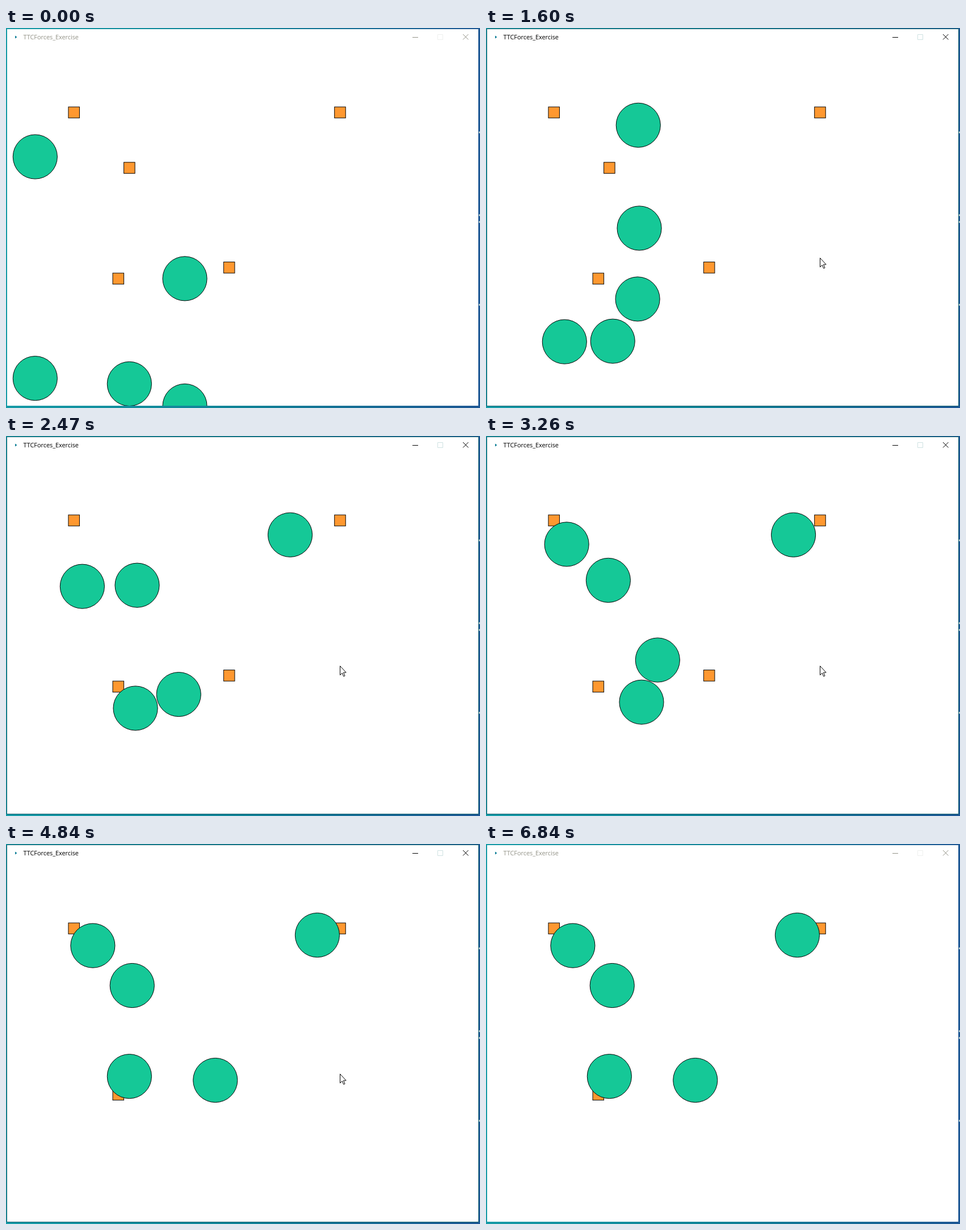
Write an HTML page that moves like this. It is 835 px wide and 670 px high and loops after 6900 ms.

```html
<!DOCTYPE html>
<html lang="en">
<head>
<meta charset="utf-8">
<title>TTCForces_Exercise</title>
<style>
  html, body { margin: 0; height: 100%; overflow: hidden; }
  svg { display: block; width: 835px; height: 670px; }
  .ball { fill: #15c897; stroke: #000; }
  .box { fill: #ff9830; stroke: #000; }
  .title { font: 11px "Open Sans", "Noto Sans", sans-serif; letter-spacing: -.08px; fill: var(--ink); }
  .icons { fill: none; stroke: var(--ink); }
  svg { --ink: #949489; --max: #eef0ee; --line: none; }
  svg.active { --ink: #000; --max: #cfe2e2; --line: #12606f; }
</style>
</head>
<body>
<svg id="stage" viewBox="0 0 835 670">
  <defs>
    <linearGradient id="desk">
      <stop offset="0" stop-color="#169aa6"/>
      <stop offset=".5" stop-color="#0f8296"/>
      <stop offset="1" stop-color="#1d5794"/>
    </linearGradient>
    <clipPath id="view"><path d="M2 2H832V666H2Z"/></clipPath>
  </defs>
  <path fill="url(#desk)" d="M0 0H835V670H0Z"/>
  <path stroke="#c3d3cf" stroke-width="3" d="M833 184h2M833 330h2M833 342h2M833 488h2"/>
  <path fill="#fff" d="M2 2H832V666H2Z"/>
  <path fill="none" stroke="var(--line)" d="M1.5 1.5H832.5V666.5H1.5Z"/>
  <path fill="#087b94" d="M16 13.5L19.5 16 16 18.5Z"/>
  <text class="title" x="30.5" y="20">TTCForces_Exercise</text>
  <g class="icons">
    <path d="M716 16.5h10"/>
    <path stroke="var(--max)" d="M760.5 11.5h9v9h-9z"/>
    <path d="M805 11l9.5 9.5M814.5 11l-9.5 9.5"/>
  </g>
  <g clip-path="url(#view)">
    <g id="scene" transform="translate(2.5 31.7) scale(.9766)"></g>
  </g>
  <path id="cursor" fill="#fff" stroke="#000" d="M.5.5V16.5L4.2 13 6.8 18.8 9 17.8 6.5 12H11.2Z"/>
</svg>
<script>
const LOOP = 6900, STEP = 66.1, START = 1005;
const stage = document.getElementById('stage');
const scene = document.getElementById('scene');
const cursor = document.getElementById('cursor');

const boxes = [[120, 120], [600, 120], [220, 220], [400, 400], [200, 420]];

// Where each ball is at the shared moments after the start.
const moments = [0, 595, 1455, 2248, 3105, 3835];
const routes = [
  '50,200 272,143 510,146 552,146 558,136 559,132',
  '320,420 274,329 234,237 218,228 222,223 225,223',
  '50,600 139,534 231,459 278,448 358,411 375,394',
  '220,610 226,533 309,434 307,372 235,383 220,387',
  '320,650 271,457 135,239 143,163 152,150 154,151'
].map(r => r.split(' ').map(p => p.split(',').map(Number)));

// Critically damped progress: rest, quick pull, slow arrival.
const damped = ms => 1 - (1 + .0012 * ms) * Math.exp(-.0012 * ms);
const knots = moments.map(damped);
const last = knots.length - 1;

function slope(p, i) {
  const sec = j => (p[j + 1] - p[j]) / (knots[j + 1] - knots[j]);
  if (i === 0) return 2 * sec(0) - slope(p, 1);
  if (i === last) return sec(last - 1);
  const w = (knots[i] - knots[i - 1]) / (knots[i + 1] - knots[i - 1]);
  return sec(i - 1) * (1 - w) + sec(i) * w;
}

function spline(p, s) {
  const i = Math.max(0, knots.findIndex(k => k >= s) - 1);
  const d = knots[i + 1] - knots[i], u = (s - knots[i]) / d;
  return p[i] + (p[i + 1] - p[i]) * u * u * (3 - 2 * u)
    + d * u * (1 - u) * ((1 - u) * slope(p, i) - u * slope(p, i + 1));
}

const clamp = (v, lo, hi) => Math.min(hi, Math.max(lo, v));

function glide(t, from, to) {
  const u = clamp((t - from) / (to - from), 0, 1);
  return u * u * (3 - 2 * u);
}

function pointer(t) {
  const away = 1 - glide(t, 40, 476), nudge = glide(t, 5440, 5568), leave = glide(t, 5705, 6170);
  return [588 + 142 * away + 26 * nudge + 112 * leave, 405 + 271 * away + 23 * nudge + 246 * leave];
}

function add(tag, attrs) {
  const el = document.createElementNS('http://www.w3.org/2000/svg', tag);
  for (const k in attrs) el.setAttribute(k, attrs[k]);
  return scene.appendChild(el);
}

for (const [x, y] of boxes) add('rect', { class: 'box', x: x - 10, y: y - 10, width: 20, height: 20 });
const balls = routes.map(() => add('circle', { class: 'ball', r: 40 }));

const move = (el, [x, y]) => el.setAttribute('transform', `translate(${x} ${y})`);

function draw() {
  const t = performance.now() % LOOP;
  const q = (Math.floor(t / STEP) + .21) * STEP;
  const s = damped(clamp(q - START, 0, moments[last]));
  stage.classList.toggle('active', t >= 540 && t < 6840);
  balls.forEach((ball, i) => move(ball, [0, 1].map(c => spline(routes[i].map(p => p[c]), s))));
  move(cursor, pointer(q).map(Math.round));
  requestAnimationFrame(draw);
}
draw();
</script>
</body>
</html>
```
